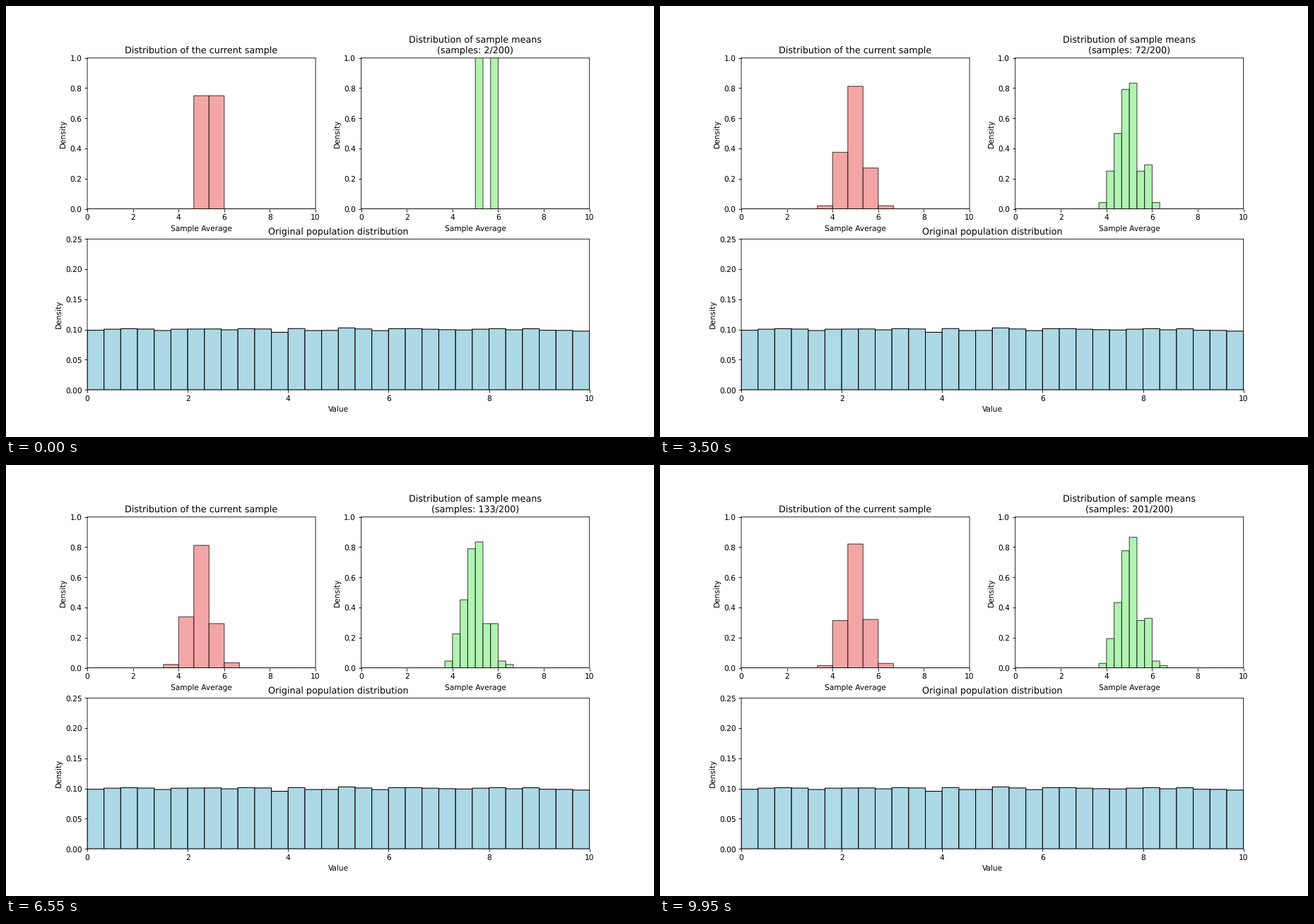
Animation, 917 px wide and 611 px high, one loop 10000 ms. Source, as a matplotlib script:

```python
import numpy as np
import matplotlib.pyplot as plt
from matplotlib.animation import FuncAnimation

DPI = 917 / 12
FRAMES = 200
BINS = 30

# Means per bin at the end of the loop, from 11/3 upwards in steps of 1/3
FIRST_BIN = 11
FINAL = np.array([2, 13, 29, 52, 58, 21, 22, 3, 1])
OPENING = [4, 6]  # bins of the two means present at the start


def arrival_order():
    """Bin of each new mean: bins fill steadily, the lower ones a bit sooner."""
    left = FINAL - np.bincount(OPENING, minlength=len(FINAL))
    pace = np.linspace(0.6, 1.5, len(FINAL))
    slots = [(((j + 0.5) / m) ** (1 / pace[b]), b)
             for b, m in enumerate(left) for j in range(m)]
    return OPENING + [b for _, b in sorted(slots)]


def histogram(ax, heights, color, title, xlabel, top, alpha=None):
    width = 10 / len(heights)
    bars = ax.bar(np.arange(len(heights)) * width, heights, width, align="edge",
                  color=color, edgecolor="black", alpha=alpha)
    ax.set(xlim=(0, 10), ylim=(0, top), xlabel=xlabel, ylabel="Density")
    return bars, ax.set_title(title)


def set_density(bars, counts):
    scale = len(counts) / 10 / counts.sum()
    for bar, count in zip(bars, counts):
        bar.set_height(count * scale)


arrivals = np.array(arrival_order()) + FIRST_BIN
np.random.seed(42)
population = np.random.uniform(0, 10, 100_000)
density, _ = np.histogram(population, BINS, (0, 10), density=True)

# Soft, unsnapped lines and letters
plt.rcParams.update({"path.snap": False, "text.hinting": "none"})
fig = plt.figure(figsize=(12 + 1e-6, 611 / DPI + 1e-6), dpi=DPI)
dx, dy = 0.5 / 1200, 0.5 / 800
grid = fig.add_gridspec(2, 2, left=0.125 + dx, right=0.9 + dx,
                        bottom=0.11 - dy, top=0.88 - dy)
sample_bars, _ = histogram(
    fig.add_subplot(grid[0, 0]), np.zeros(BINS // 2), "lightcoral",
    "Distribution of the current sample", "Sample Average", 1, 0.7)
mean_bars, mean_title = histogram(
    fig.add_subplot(grid[0, 1]), np.zeros(BINS), "lightgreen",
    "", "Sample Average", 1, 0.7)
histogram(
    fig.add_subplot(grid[1, :]), density, "lightblue",
    "Original population distribution", "Value", 0.25)


def update(frame):
    total = frame + len(OPENING)
    counts = np.bincount(arrivals[:total], minlength=BINS)
    set_density(mean_bars, counts)
    set_density(sample_bars, counts.reshape(-1, 2).sum(axis=1))
    mean_title.set_text(
        f"Distribution of sample means\n(samples: {total}/200)")
    return [*sample_bars, *mean_bars, mean_title]


anim = FuncAnimation(fig, update, frames=FRAMES, interval=50,
                     init_func=lambda: update(0), repeat=True, repeat_delay=0)
plt.show()
```
